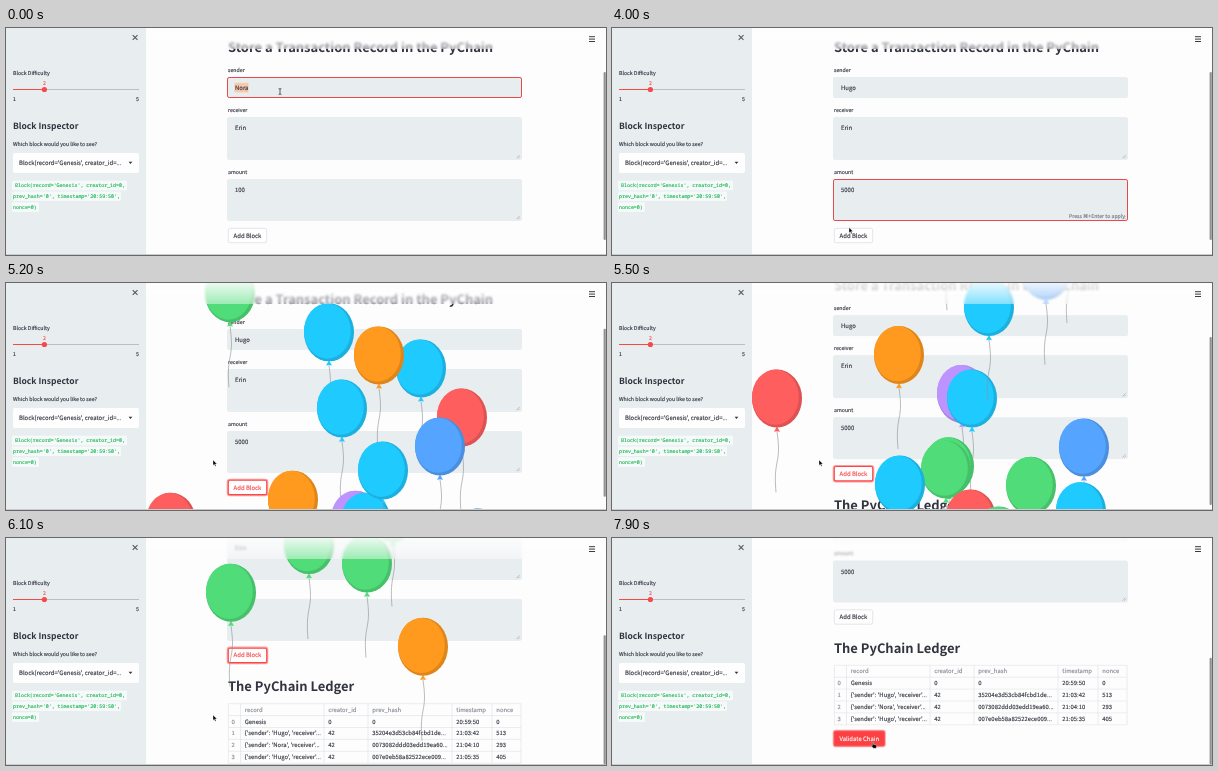
An HTML page for the animation above (8000 ms loop, 600 px wide and 227 px high).

```html
<!DOCTYPE html>
<html lang="en">
<head>
<meta charset="utf-8">
<title>PyChain</title>
<style>
  html, body { margin: 0; width: 100%; height: 100%; overflow: hidden; background: #fdfdfd; }
  svg { position: absolute; left: 0; top: 0; width: 600px; height: 227px; }
  text { font-family: "Noto Sans CJK JP", "Noto Sans CJK SC", "Noto Sans CJK", "DejaVu Sans", sans-serif; text-rendering: geometricPrecision; }
  .code { font-family: "Noto Sans Mono", "Liberation Mono", monospace; }
  .key { font-family: "DejaVu Sans", sans-serif; }
  #header {
    position: absolute; left: 140px; top: 0; width: 455px; height: 21px;
    background: linear-gradient(rgba(253,253,253,.9), rgba(253,253,253,.45));
    backdrop-filter: blur(1.3px);
  }
</style>
</head>
<body>
<svg id="page" viewBox="0 0 600 227"></svg>
<div id="header"></div>
<svg id="chrome" viewBox="0 0 600 227"></svg>
<svg id="overlay" viewBox="0 0 600 227"></svg>
<script>
const LOOP = 8000, INK = '#31333f', GRAY = '#858994', RED = '#f8484a', PANEL = '#e8edf0';
const $ = id => document.getElementById(id);

// A hairline stroke gives small text its slightly heavy look
const text = (x, y, str, { size = 5.95, fill = INK, more = '' } = {}) =>
  `<text x="${x}" y="${y}" font-size="${size}px" fill="${fill}" ${more} stroke="${fill}" stroke-width=".14">${str}</text>`;
const rect = (x, y, w, h, fill, more = '') =>
  `<rect x="${x}" y="${y}" width="${w}" height="${h}" fill="${fill}" ${more}/>`;
const line = (d, stroke, width) => `<path d="${d}" fill="none" stroke="${stroke}" stroke-width="${width}"/>`;
const label = (x, y, str) => text(x, y, str, { size: 5.22 });
const heading = (x, y, str, size = 12.95) => text(x, y, str, { size, more: 'font-weight="700" stroke-opacity="0"' });
const middle = 'text-anchor="middle"';

// Keyframe track: rows of [time, ...values]
const smooth = u => u * u * (3 - 2 * u);
function track(keys, t, ease = u => u) {
  const next = keys.findIndex(k => k[0] > t);
  if (next === 0) return keys[0].slice(1);
  if (next < 0) return keys.at(-1).slice(1);
  const a = keys[next - 1], b = keys[next], u = ease((t - a[0]) / (b[0] - a[0]));
  return a.slice(1).map((v, i) => v + (b[i + 1] - v) * u);
}

const typed = (word, start, step, t) => word.slice(0, Math.max(0, Math.floor((t - start) / step) + 1));

// Form -------------------------------------------------------------
function field({ name, y, h, value, focused, selected, hint, area = true }) {
  const inset = y + 12;
  return label(222, y - 6.4, name)
    + rect(221.5, y - .5, 294, h, PANEL, `rx="1.6" stroke="${focused ? '#e8484a' : PANEL}"`)
    + (selected ? rect(228.5, inset - 7.2, selected, 9.6, '#f8c9a9') : '')
    + text(229, inset, value)
    + (hint ? text(513, y + h - 2.6, hint, { size: 5.2, fill: '#747883', more: 'text-anchor="end"' }) : '')
    + (area ? line(`M510.5 ${y + h - 1.8}l3.2 -3.2m-1.4 3.2l1.4 -1.4`, '#8b8f95', .5) : '');
}

function button(x, y, w, str, state) {
  const active = state !== 'idle';
  const ring = state === 'focus' || state === 'ring';
  const filled = state === 'pressed' || state === 'ring';
  return (ring ? rect(x - .5, y - .5, w + 1, 16, 'none', 'rx="2.2" stroke="#ff9d9d" stroke-width="1.6"') : '')
    + rect(x + .3, y + .3, w - .6, 14.4, filled ? '#fb4143' : '#fefefe',
        `rx="1.7" stroke="${active ? RED : '#d3d6da'}" stroke-width="${ring ? 1.1 : .6}"`)
    + text(x + w / 2, y + 9.6, str, { fill: filled ? '#fff' : active ? RED : INK, more: middle });
}

// Ledger -----------------------------------------------------------
const COLUMNS = [222.4, 234.5, 318, 362, 446, 486, 515];
const record = name => `{'sender': '${name}', 'receiver'...`;
const ROWS = [
  ['', 'record', 'creator_id', 'prev_hash', 'timestamp', 'nonce'],
  [0, 'Genesis', 0, 0, '20:59:50', 0],
  [1, record('Hugo'), 42, '35204e3d53cb84fcbd1de...', '21:03:42', 513],
  [2, record('Nora'), 42, '0073082ddd03edd19ea60...', '21:04:10', 293],
  [3, record('Hugo'), 42, '007e0eb58a82522ece009...', '21:05:35', 405],
];
const TABLE_Y = 255.8, ROW_H = 11.9;
const ledger = heading(222, 243.3, 'The PyChain Ledger')
  + line(COLUMNS.map(x => `M${x} ${TABLE_Y}v${ROW_H * 5}`).join('')
    + [0, 1, 2, 3, 4, 5].map(i => `M222.4 ${TABLE_Y + i * ROW_H}H515`).join(''), '#dde1e5', .6)
  + ROWS.map((row, r) => row.map((cell, c) =>
      text(COLUMNS[c] + (c ? 4.3 : 3.2), TABLE_Y + r * ROW_H + 8, cell, { size: 5.9, fill: r && c ? INK : GRAY })
    ).join('')).join('');

// Balloons ---------------------------------------------------------
// Ease-in curve, bezier (.42, 0, 1, 1)
const bezX = u => 1.26 * u * (1 - u) ** 2 + 3 * u * u * (1 - u) + u ** 3;
const bezY = smooth;
function solve(fn, value) {
  let lo = 0, hi = 1;
  for (let i = 0; i < 24; i++) { const mid = (lo + hi) / 2; fn(mid) < value ? lo = mid : hi = mid; }
  return lo;
}
const RISE = 750, FROM = 256, DISTANCE = 351;
const COLORS = { cyan: '#1fcaff', green: '#50dd79', orange: '#ff9a1e', red: '#ff5e5e', blue: '#55a4ff', purple: '#bd94ff' };
// Each wave: balloons with the x, y they pass at a given time
const wave = (time, list) => list.map(([color, x, y]) =>
  ({ color: COLORS[color], x, start: time - RISE * bezX(solve(bezY, (FROM - y) / DISTANCE)) }));
const balloons = [
  ...wave(5200, [
    ['green', 224, 11], ['cyan', 323, 50], ['cyan', 415, 86], ['orange', 373, 73], ['cyan', 336, 126],
    ['red', 456, 135], ['blue', 434, 164], ['purple', 350, 237], ['cyan', 360, 239], ['cyan', 377, 188],
    ['orange', 287, 217], ['red', 165, 239],
  ]),
  ...wave(5800, [
    ['blue', 472, -10], ['green', 337, 18], ['green', 334, 23], ['cyan', 288, 47], ['green', 419, 49],
    ['cyan', 469, 94], ['red', 359, 109], ['green', 361, 189], ['green', 387, 155], ['green', 303, 177],
    ['green', 225, 207], ['orange', 417, 236],
  ]),
];
function balloon({ color, x, start }, t) {
  const u = (t - start) / RISE;
  if (t < 4850 || u <= 0 || u >= 1) return '';
  const y = FROM - DISTANCE * bezY(solve(bezX, u));
  return `<g transform="translate(${x} ${y})" fill="${color}">`
    + line('M0 33C2 48 2 54 0 64S-2 82 -1 94', '#8c8f94', .6)
    + '<path d="M0 28l3 5.2q-3 -1 -6 0z"/><ellipse rx="25" ry="29"/>'
    + '<ellipse rx="25" ry="29" fill="#000" opacity=".13"/>'
    + '<ellipse cx="-1.6" cy="-1.3" rx="23.4" ry="27.6"/></g>';
}

// Mouse ------------------------------------------------------------
const MOUSE = [
  [1000, 274, 63.5], [1800, 236, 168], [3400, 236, 168], [4000, 237, 199.5], [4400, 238, 203],
  [4700, 207, 177], [6700, 207, 177], [7400, 261, 204],
];
const POINTERS = {
  ibeam: line('M-1.4 -3q1.4 0 1.4 1v4q0 1 -1.4 1M1.4 -3q-1.4 0 -1.4 1M1.4 3q-1.4 0 -1.4 -1', '#222', .7),
  arrow: '<path d="M0 0v5.4l1.3 -1.1l.9 2l1 -.4l-.9 -2h1.7z" fill="#000" stroke="#fff" stroke-width=".4"/>',
  hand: '<path d="M-.6 .4q.6 -.8 1.1 0v2l2.6 .6q.7 .2 .6 1l-.5 2.2h-3l-2 -2.6q.2 -.8 1.2 0z" fill="#000" stroke="#fff" stroke-width=".4"/>',
};
function pointer(t) {
  if (t >= 150 && t < 1000 || t >= 2500 && t < 3400) return '';
  const [x, y] = track(MOUSE, t, smooth);
  const kind = t < 3500 ? 'ibeam' : t >= 4100 && t < 4500 || t >= 7300 ? 'hand' : 'arrow';
  return `<g transform="translate(${x} ${y})">${POINTERS[kind]}</g>`;
}

// Sidebar and fixed parts ------------------------------------------
const codeLine = (x, y, str, w) => rect(6, y - 6.5, w, 9.6, '#f6f9fa', 'rx="1"')
  + text(x, y, str, { size: 4.96, fill: '#1cb752', more: 'class="code"' });
$('chrome').innerHTML = rect(0, 0, 140, 227, PANEL)
  + line('M126.7 7.1l4.8 4.8m0 -4.8l-4.8 4.8', '#555a63', 1.1)
  + label(7, 47, 'Block Difficulty')
  + rect(38, 61, 95, 1, '#b9c0c7') + rect(7, 61, 31.5, 1, RED)
  + `<circle cx="38.4" cy="61.5" r="2.6" fill="${RED}"/>`
  + text(38.4, 56.6, 2, { size: 5.22, fill: RED, more: middle })
  + label(7, 73.3, 1) + label(130, 73.3, 5)
  + heading(7, 101.4, 'Block Inspector', 8.55)
  + label(7, 118.4, 'Which block would you like to see?')
  + rect(7, 125, 126, 20, '#fefefe', 'rx="1.8"')
  + text(13, 136.9, "Block(record='Genesis', creator_id=...")
  + `<path d="M122.6 133.8h3.8l-1.9 2.1z" fill="${INK}"/>`
  + codeLine(9, 159.2, "Block(record='Genesis', creator_id=0,", 115)
  + codeLine(7, 170, "prev_hash='0', timestamp='20:59:50',", 109)
  + codeLine(7, 180.8, 'nonce=0)', 27)
  + line('M583 8.7h6M583 11.1h6M583 13.5h6', '#3a3c45', 1)
  + rect(0, 226, 600, 1, '#c9cccf');

// Scene ------------------------------------------------------------
const SCROLL = [[4900, 0], [5200, 3], [5800, 30.5], [6100, 90], [6400, 124], [6550, 128.5]];

function draw(t) {
  const [scroll] = track(SCROLL, t);
  const typingName = t >= 200, typingAmount = t >= 2600;
  const add = t < 4100 ? 'idle' : t < 4300 ? 'hover' : t < 4500 ? 'pressed' : t < 7500 ? 'focus' : 'idle';
  const validate = t < 7300 ? 'idle' : t < 7500 ? 'hover' : t < 7600 ? 'pressed' : 'ring';

  $('page').innerHTML = `<g transform="translate(0 ${-scroll})">`
    + heading(222, 24.1, 'Store a Transaction Record in the PyChain')
    + field({ name: 'sender', y: 50, h: 20, area: false, focused: t < 1900,
        value: typingName ? typed('Hugo', 200, 150, t) : 'Nora', selected: typingName ? 0 : 14,
        hint: typingName && t < 1900 && 'Press Enter to apply' })
    + field({ name: 'receiver', y: 90, h: 42, value: 'Erin' })
    + field({ name: 'amount', y: 152, h: 41, focused: t >= 1900 && t < 4300,
        value: typingAmount ? typed('5000', 2600, 150, t) : '100', selected: t >= 2000 && !typingAmount ? 10.5 : 0,
        hint: typingAmount && t < 4300 && 'Press <tspan class="key">⌘</tspan>+Enter to apply' })
    + button(222, 200, 39, 'Add Block', add)
    + ledger
    + button(222, 321.5, 50.5, 'Validate Chain', validate)
    + '</g>' + balloons.map(b => balloon(b, t)).join('');

  const thumb = 44 + .59 * scroll;
  $('overlay').innerHTML = rect(597.6, thumb, 2.2, Math.min(168, 226.5 - thumb), '#8f9194', 'rx="1"') + pointer(t);
}

function tick() {
  draw(performance.now() % LOOP);
  requestAnimationFrame(tick);
}
tick();
</script>
</body>
</html>
```
